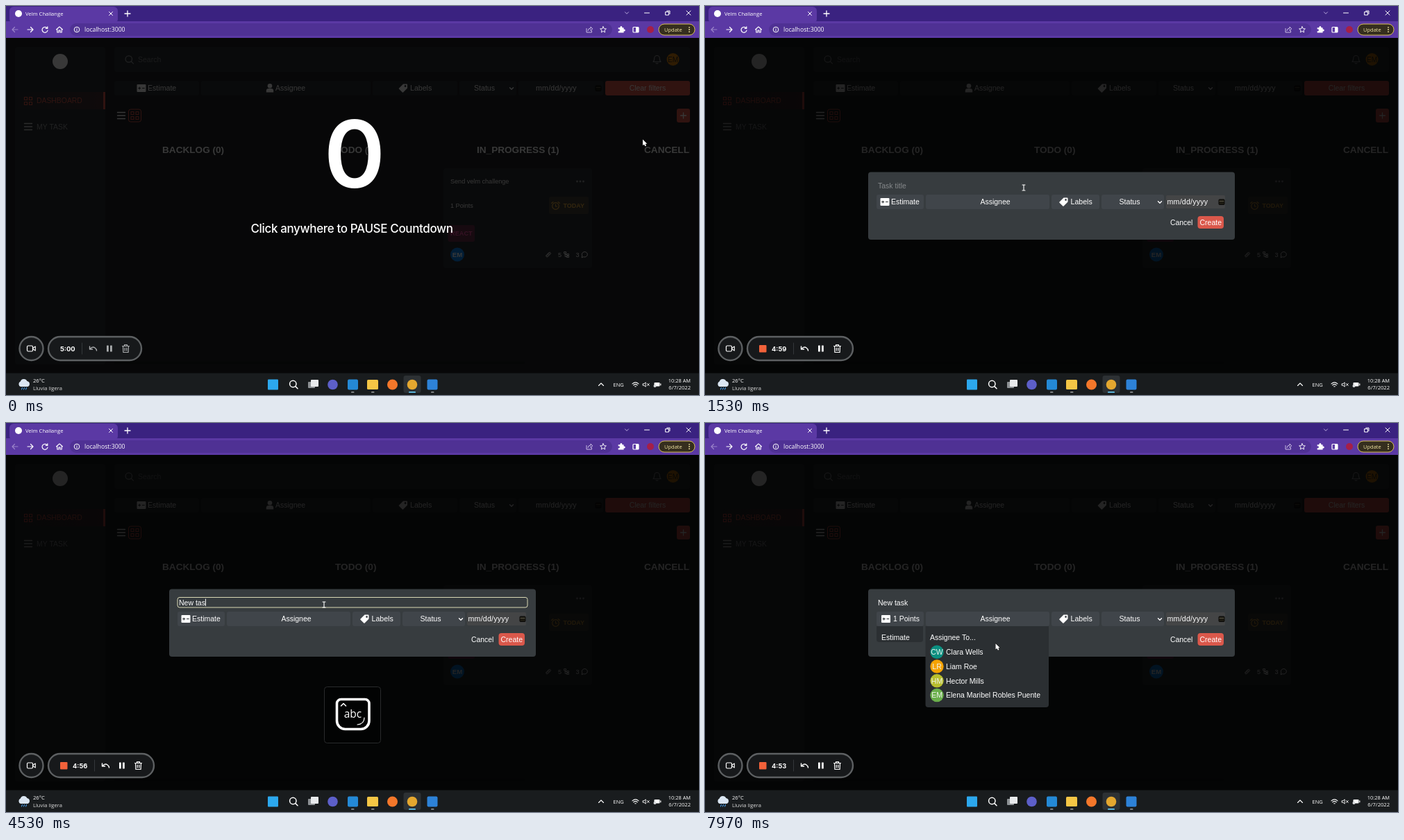
An HTML page with a canvas that plays this animation: 998 by 561 pixels, repeating every 8 s.

```html
<!DOCTYPE html>
<html lang="en">
<head>
<meta charset="utf-8">
<title>Task board</title>
<style>
html, body { margin: 0; width: 100%; height: 100%; overflow: hidden; background: #000; }
canvas { display: block; width: 998px; height: 561px; }
</style>
</head>
<body>
<canvas id="stage"></canvas>
<script>
const W = 998, H = 561, LOOP = 8000;
const canvas = document.getElementById('stage');
const ratio = window.devicePixelRatio || 1;
canvas.width = Math.round(W * ratio);
canvas.height = Math.round(H * ratio);
const c = canvas.getContext('2d');

const SANS = '"Liberation Sans", Arial, sans-serif';
const UI = '"Open Sans", "Noto Sans", sans-serif';
const INTER = 'Inter, sans-serif';
const RED = '#da584b', PAGE = '#1e2225', PANEL = '#2b2f32', WHITE = '#fff', GREY = '#94979a';
const FRAME = '#3a2280', BAR = '#5b39a4';

// ---- helpers ----
const ramp = (t, a, b) => {
  const u = Math.min(1, Math.max(0, (t - a) / (b - a)));
  return u * u * (3 - 2 * u);
};
const within = (t, a, b) => t >= a && t < b;
const latest = (list, t) => list.filter(e => e[0] <= t).pop();

function box(x, y, w, h, r, fill, stroke, lw = 1) {
  c.beginPath();
  c.roundRect(x, y, w, h, r);
  if (fill) { c.fillStyle = fill; c.fill(); }
  if (stroke) { c.strokeStyle = stroke; c.lineWidth = lw; c.stroke(); }
}
function disc(x, y, r, fill, stroke, lw) { box(x - r, y - r, 2 * r, 2 * r, r, fill, stroke, lw); }
function text(s, x, y, size, color = WHITE, font = SANS, weight = 400, align = 'left', gap = 0) {
  c.font = `${weight} ${size}px ${font}`;
  c.textAlign = align;
  c.letterSpacing = gap + 'px';
  c.fillStyle = color;
  c.fillText(s, x, y);
}
function line(d, x, y, color = WHITE, lw = 1) {
  c.save();
  c.translate(x, y);
  c.strokeStyle = color;
  c.lineWidth = lw;
  c.lineCap = c.lineJoin = 'round';
  c.stroke(new Path2D(d));
  c.restore();
}
function solid(d, x, y, color = WHITE) {
  c.save();
  c.translate(x, y);
  c.fillStyle = color;
  c.fill(new Path2D(d), 'evenodd');
  c.restore();
}
function faded(alpha, draw) {
  if (alpha <= 0) return;
  c.save();
  c.globalAlpha *= alpha;
  draw();
  c.restore();
}

// ---- icons ----
const CHEVRON = 'M-2.5 -1.2L0 1.3L2.5 -1.2';
const MENU = 'M-5.5 -4.5H5.5M-5.5 0H5.5M-5.5 4.5H5.5';
const CROSS = 'M-2.5 -2.5L2.5 2.5M2.5 -2.5L-2.5 2.5';
const PLUS = 'M-4 0H4M0 -4V4';
const GRID = 'M-5.5 -5.5h4v4h-4zM1.5 -5.5h4v4h-4zM-5.5 1.5h4v4h-4zM1.5 1.5h4v4h-4z';
const TAG = 'M6 -5Q6 -6 5 -6H0L-6 0Q-6.6 .6 -6 1.2L-1.2 6Q-.6 6.6 0 6L6 0ZM3 -4.4a1.4 1.4 0 1 0 .1 0Z';
const LENS = 'M4 -.5A4.7 4.7 0 1 1 -5.4 -.5A4.7 4.7 0 1 1 4 -.5M2.7 2.9L6 6.2';

function points(x, y) {
  box(x - 6.5, y - 5.5, 13, 11, 1, WHITE);
  line('M-4.3 0H-1.3M-2.8 -1.5V1.5M1.5 0H4.3', x, y, PANEL, 1.1);
}
function calendar(x, y) {
  box(x - 4, y - 3.5, 8, 7.5, 1, '#1c1a12', '#090909');
  line('M-3 -1H3', x, y, '#6b6656', .7);
}
function avatar(s, x, y, r, fill, color = WHITE, size = 10) {
  disc(x, y, r, fill);
  text(s, x, y + size * .36, size, color, SANS, 400, 'center');
}

// ---- page ----
function filterRow() {
  [[156, 122], [281, 244], [528, 122], [653, 82], [738, 122]].forEach(([x, w]) => box(x, 108, w, 21, 3, PANEL));
  points(195, 118.5);
  text('Estimate', 204, 122, 10.6);
  disc(380, 115.3, 3.3, WHITE);
  solid('M-5.2 6.5V4Q-5 1 -2 1H2Q5 1 5.2 4V6.5Z', 380, 118, WHITE);
  text('Assignee', 388, 122, 10.5);
  solid(TAG, 572, 118.5);
  text('Labels', 582, 122, 10.6);
  text('Status', 674, 122, 10.6);
  line(CHEVRON, 728, 119, WHITE, 1.4);
  text('mm/dd/yyyy', 763, 122, 10.67, WHITE, SANS, 400, 'left', .2);
  calendar(853, 118.5);
  box(863, 108, 122, 21, 3, RED);
  text('Clear filters', 924, 122, 10.4, WHITE, SANS, 400, 'center');
}

function taskCard() {
  box(630, 234, 214, 144, 4, PANEL);
  text('Send velm challenge', 640, 255.5, 9.1);
  [822.5, 827, 831.5].forEach(x => disc(x, 253, 1.4, GREY));
  text('1 Points', 640, 291, 9.1);
  box(782, 275, 57, 25, 3, 'rgba(229,180,84,.13)');
  disc(791.5, 288.5, 4.8, null, '#e5a940', 1.2);
  line('M0 -2.5V.5H2M-6 -4L-3.5 -6M6 -4L3.5 -6', 791.5, 288.5, '#e5a940', 1.1);
  text('TODAY', 802.5, 291.2, 9, '#e5a940', SANS, 700);
  box(636.5, 316, 38.5, 24, 3, '#682c4b');
  text('REACT', 640, 331.2, 9.2, '#f04f9d', SANS, 700);
  disc(650, 358.5, 10, '#0a84f0');
  text('EM', 650, 362, 9.6, WHITE, SANS, 700, 'center');
  line('M-3 1.5L1 -2.8Q2.6 -3.8 3.3 -2.4Q3.6 -1.4 2.8 -.6L-.6 3Q-2.5 4 -3.2 2.5Q-3.5 1.6 -2.4 .5L.6 -2.4M-1.2 1.6L1.6 -1.2', 781, 358.5, WHITE, .9);
  text('5', 795, 361.7, 9.1);
  line('M-3 -4h2.6v2.4h-2.6zM-1.8 -1.6V3H1M-1.8 0H1M1 -1h2.6v2h-2.6zM1 2h2.6v2h-2.6z', 807, 358.5, WHITE, .9);
  text('3', 820.5, 361.7, 9.1);
  line('M-3.8 4L-3.2 1.6A4 3.8 0 1 1 -1 3.4Z', 833, 358.5, WHITE, 1);
}

function page() {
  c.fillStyle = PAGE;
  c.fillRect(0, 46, W, 484);
  box(13, 59, 130, 458, 4, PANEL);
  disc(78, 80, 11, WHITE);
  const glow = c.createLinearGradient(13, 0, 143, 0);
  glow.addColorStop(0, 'rgba(200,40,35,0)');
  glow.addColorStop(1, 'rgba(200,40,35,.17)');
  c.fillStyle = glow;
  c.fillRect(13, 124, 130, 25);
  c.fillStyle = RED;
  c.fillRect(140, 124, 3, 25);
  line(GRID, 32, 137, RED, 1.2);
  text('DASHBOARD', 44, 140, 10.4, RED);
  line(MENU, 32, 174, '#c6c8c9', 1.4);
  text('MY TASK', 44, 178, 10.4, GREY);

  box(156, 59, 829, 36, 4, PANEL);
  line(LENS, 177.5, 77, GREY, 1.2);
  text('Search', 190, 80.5, 10.5, '#777a7d');
  line('M-5.5 3.5H5.5Q3.8 2 3.8 -1.5A3.8 4 0 0 0 -3.8 -1.5Q-3.8 2 -5.5 3.5ZM-1.4 5.5Q0 6.6 1.4 5.5', 937.5, 77, GREY, 1.1);
  avatar('EM', 960.5, 77, 9, '#d5800c', '#292522', 10);
  filterRow();

  line(MENU, 166, 158, WHITE, 1.4);
  box(176.5, 149, 18, 18, 3, null, RED);
  line(GRID, 185.5, 158, RED, 1.1);
  box(966, 148, 19, 20, 3, RED);
  line(PLUS, 975.5, 158, WHITE, 1.3);

  const head = (s, x) => text(s, x, 212, 13.6, WHITE, SANS, 700);
  head('BACKLOG (0)', 225);
  head('TODO (0)', 474);
  head('IN_PROGRESS (1)', 678);
  c.save();
  c.beginPath();
  c.rect(900, 190, 85, 40);
  c.clip();
  head('CANCELLED (0)', 919);
  c.restore();
  taskCard();
  box(156, 512.5, 591, 4, 2, '#171a1c');
}

function dim(alpha) {
  c.fillStyle = `rgba(0,0,0,${alpha})`;
  c.fillRect(0, 46, W, 484);
}

// ---- new task dialog ----
const TYPED = [[0, ''], [3000, 'N'], [3300, 'Ne'], [3600, 'New'], [3900, 'New '], [4100, 'New t'], [4250, 'New ta'], [4430, 'New tas'], [4600, 'New task']];
const FOCUS = [2200, 5860], PICK = 6650;

function dialog(t) {
  box(235, 239.5, 528, 97.5, 4, '#373c3f');
  const [since, typed] = latest(TYPED, t);
  const focused = within(t, ...FOCUS);
  if (focused) box(247, 251.5, 504, 14.5, 3, '#373c3f', '#d9d8b4', 1);
  text(typed || 'Task title', 249, 262.5, 10.5, typed ? WHITE : '#85888a');
  if (focused) {
    const idle = t - Math.max(since, FOCUS[0]);
    const x = 249.5 + c.measureText(typed).width;
    if (Math.floor(idle / 500) % 2 === 0) line('M0 -5V4.5', x, 259, WHITE, 1);
  }
  [[247, 68], [318, 178], [499, 69], [571, 90]].forEach(([x, w]) => box(x, 272, w, 21, 3, '#40454a'));
  box(664, 273, 85, 19, 2, '#444546');
  const picked = t >= PICK;
  points(picked ? 260.5 : 259, 282.5);
  text(picked ? '1 Points' : 'Estimate', picked ? 271 : 268, 286, 10.5);
  text('Assignee', 418, 286, 10.5, WHITE, SANS, 400, 'center');
  solid(TAG, 516.5, 282.5);
  text('Labels', 526.5, 286, 10.6);
  text('Status', 596.5, 286, 10.6);
  line(CHEVRON, 655, 283, WHITE, 1.4);
  text('mm/dd/yyyy', 665.5, 286, 10.67, WHITE, SANS, 400, 'left', .2);
  calendar(744, 282.5);
  text('Cancel', 670, 315.5, 10.4);
  box(709.5, 303, 37.5, 18, 4, RED);
  text('Create', 712.5, 315.5, 10.5);
}

function menu(x, w, h, draw) {
  if (h < 1) return;
  c.save();
  c.beginPath();
  c.roundRect(x, 293, w, h, [0, 0, 4, 4]);
  c.fillStyle = PANEL;
  c.fill();
  c.clip();
  draw();
  c.restore();
}

const PEOPLE = [['Clara Wells', 'CW', '#0b8f80'], ['Liam Roe', 'LR', '#f5a300'], ['Hector Mills', 'HM', '#b8be2d'], ['Elena Maribel Robles Puente', 'EM', '#6aaf4b']];

function menus(t) {
  const rowY = i => 330 + 20.75 * i;
  menu(247, 67, 138 * ramp(t, 5880, 6050) - 115 * ramp(t, 7600, 7900), () => {
    text('Estimate', 254, 313.3, 10.5);
    [0, 1, 2, 4, 8].forEach((n, i) => {
      points(260.5, rowY(i) + .5);
      text(n + ' Points', 270.5, rowY(i) + 4, 10.5);
    });
  });
  menu(317.5, 177.5, 117 * ramp(t, 7600, 7850), () => {
    text('Assignee To...', 324, 313.3, 10.5);
    PEOPLE.forEach(([name, initials, color], i) => {
      avatar(initials, 334, rowY(i) + .3, 9.7, color, '#eef4ee', 10.5);
      text(name, 347, rowY(i) + 4, 10.5);
    });
  });
}

function suggestions(x, w, words) {
  c.save();
  c.shadowColor = 'rgba(0,0,0,.5)';
  c.shadowBlur = 5;
  box(x, 230, w, 22, 4, '#222325');
  c.restore();
  words.forEach(([s, wx]) => text(s, wx, 245, 8.7, '#eee', UI));
}

function capsNotice() {
  box(458.5, 380.5, 81, 81, 4, '#020303', '#292b2c');
  box(476.5, 398.5, 46.5, 43, [6, 6, 12, 12], null, WHITE, 3.6);
  line('M-3.5 2L0 -1.5L3.5 2', 486, 406, WHITE, 1.6);
  text('abc', 499.5, 425, 15.5, WHITE, UI, 400, 'center');
  line('M5 -5Q5 4 -5 5', 511, 430, WHITE, 1.2);
}

// ---- recorder ----
function countdown() {
  dim(.78);
  text('0', 502, 262, 134, WHITE, INTER, 600, 'center');
  text('Click anywhere to PAUSE Countdown', 352.5, 327, 17, WHITE, INTER, 500, 'left', -.36);
}

function recorder(t) {
  const live = ramp(t, 120, 320), shift = 18 * live;
  const tone = live > .5 ? WHITE : '#a9abad';
  const back = '#17191b', rim = '#5d6062';
  disc(36.5, 494, 17, back, rim, 2.4);
  box(30.5, 490, 8, 8, 1.5, null, WHITE, 1.2);
  line('M2.5 -.8L5.8 -3V3L2.5 .8', 36.5, 494, WHITE, 1.1);
  box(61, 477, 134 + shift, 34, 17, back, rim, 2.4);
  faded(live, () => box(78, 489, 10.5, 10.5, 1, '#f2623a'));
  const left = 300 - Math.floor(t / 1000);
  const clock = `${Math.floor(left / 60)}:${String(left % 60).padStart(2, '0')}`;
  text(clock, 78 + shift, 497.5, 9.4, WHITE, INTER, 700);
  line('M0 -8V8', 109.5 + shift, 494, '#34373a', 1);
  line('M-5 -3V1H-1M-4.6 .6Q-1 -3.5 2.6 -1Q5 .8 5 3', 125.5 + shift, 494, tone, 1.4);
  box(145 + shift, 489.5, 2.8, 9, .5, tone);
  box(150 + shift, 489.5, 2.8, 9, .5, tone);
  line('M-5 -3.5H5M-2 -3.5V-5.3H2V-3.5M-4 -3.5L-3.6 5.5H3.6L4 -3.5M-1.3 -1V3M1.3 -1V3', 172.5 + shift, 494, tone, 1.2);
}

// ---- browser and taskbar ----
function browser() {
  c.fillStyle = FRAME;
  c.fillRect(0, 0, W, 23);
  c.fillStyle = BAR;
  c.fillRect(0, 22, W, 24);
  box(5, 1, 156, 24, 6, BAR);
  disc(18, 11, 5, WHITE);
  text('Velm Challange', 28, 13.8, 7.6, WHITE, UI);
  line(CROSS, 151, 11, WHITE, 1);
  line(PLUS, 175, 11, WHITE, 1.3);
  line(CHEVRON, 894, 10, '#b9a9dd', 1);
  line('M-3.5 0H3.5', 923, 10, WHITE, 1);
  line('M-3 -1.5H1.5V3H-3ZM-1.3 -3H3V1.4', 953, 10, WHITE, 1);
  line('M-3 -3L3 3M3 -3L-3 3', 983, 10, WHITE, 1);

  line('M4 0H-4M-.5 -3.5L-4 0L-.5 3.5', 13, 34, '#9a83c9', 1.2);
  line('M-4 0H4M.5 -3.5L4 0L.5 3.5', 35, 34, WHITE, 1.2);
  line('M3.2 -2.2A4 4 0 1 0 4 1M3.8 -4.2V-1.6H1.2', 56, 34, WHITE, 1.2);
  line('M-4.5 0L0 -4L4.5 0M-3.2 -.6V4H-1V1H1V4H3.2V-.6', 77, 34, WHITE, 1.1);
  box(92, 25, 781, 18, 9, '#4f3194');
  disc(102, 34, 3.8, null, WHITE);
  line('M0 -.2V1.8M0 -1.8V-1.7', 102, 34, WHITE, 1);
  text('localhost:3000', 113, 37.2, 8.7, WHITE, UI);
  line('M-4 -1.5V4H3.5V2M-2 1.5Q-1.5 -2 2 -2V-4L4.8 -1L2 1.6V0', 840, 34, '#d5cbea', .9);
  line('M0 -4.3L1.3 -1.4L4.4 -1.1L2 1L2.7 4L0 2.4L-2.7 4L-2 1L-4.4 -1.1L-1.3 -1.4Z', 860, 34, WHITE, .9);
  solid('M-4.3 -2.8H-1.5A1.5 1.6 0 1 1 1.3 -2.8H3.6V-.4A1.5 1.5 0 1 1 3.6 2.3V4.6H-4.3V2A1.5 1.5 0 1 0 -4.3 -.6Z', 886, 34);
  box(903, 30.5, 8, 7.5, 1, null, WHITE, 1.2);
  c.fillStyle = WHITE;
  c.fillRect(907, 30.5, 4, 7.5);
  disc(928, 34, 5, '#a51f47');
  box(940, 26, 52, 16, 8, '#352e1e', '#d6be55', 1);
  text('Update', 948, 36.8, 7.5, '#f4e7a5', UI);
  [-3.2, 0, 3.2].forEach(d => disc(984, 34 + d, .9, '#f4e7a5'));
}

function taskbar() {
  c.fillStyle = '#191c1e';
  c.fillRect(0, 529.5, W, 32);
  solid('M-5 4A4 4 0 0 1 -5.3 -3.4A5.2 5.2 0 0 1 4.4 -4A4.1 4.1 0 0 1 5 4Z', 26, 545, '#dbe6f2');
  line('M-3 0L-4 2.5M0 0L-1 2.5M3 0L2 2.5', 26.5, 550.5, '#459be8', 1.1);
  text('26°C', 39, 543, 7.6, WHITE, UI);
  text('Lluvia ligera', 39, 553.6, 7.6, '#ddd', UI);

  box(572.5, 533, 25, 25, 3, '#2d3134');
  box(377, 538.5, 15, 15, 1, '#2ca8ee');
  line(LENS, 414, 545.5, WHITE, 1.5);
  box(435, 542, 10, 9, 1, '#8d9194');
  box(439, 539, 11, 10, 1, '#e8eaec');
  disc(470.5, 546, 7.3, '#5d5fc9');
  box(492, 538.5, 15, 15, 2, '#2489d6');
  box(520, 539, 16, 14, 1.5, '#f5c645');
  disc(556.5, 546, 7.5, '#f4772a');
  disc(585, 546, 7.3, '#e4a72f');
  box(606.5, 538.5, 15, 15, 2, '#2d82d8');
  [499, 528, 614].forEach(x => box(x - 2, 556, 4.5, 1.8, 1, '#8b8e91'));
  box(580, 556, 10, 1.8, 1, '#60c5f0');

  line('M-3.5 1.5L0 -2L3.5 1.5', 857, 546, WHITE, 1.1);
  text('ENG', 874.5, 548.7, 7.5, WHITE, UI);
  line('M-4.5 -1.2Q0 -5 4.5 -1.2M-2.8 .8Q0 -1.6 2.8 .8M-.8 2.8H.8', 906.5, 546, WHITE, 1.1);
  line('M-4.5 -1.2H-3L-.8 -3.2V3.2L-3 1.2H-4.5ZM1.5 -1.5L4.2 1.5M4.2 -1.5L1.5 1.5', 922, 546, WHITE, .9);
  box(933.5, 543, 8, 5.5, 1, WHITE);
  line('M4.8 -1V1', 938, 545.8, WHITE, 1.2);
  disc(934.5, 548, 2, '#d9dcde');
  text('10:28 AM', 986, 542.8, 7.4, WHITE, UI, 400, 'right');
  text('6/7/2022', 986, 553.4, 7.6, WHITE, UI, 400, 'right');
}

// ---- pointer ----
const PATH = [[0, 917, 192.5], [350, 917, 192.5], [980, 974.5, 163], [1150, 974.5, 163], [1480, 459, 262], [3000, 458, 262], [4850, 458, 262], [5400, 313, 290], [5600, 313, 290], [5830, 288, 284], [6100, 288, 284], [6500, 284, 354], [6950, 284, 354], [7450, 417, 285], [7650, 417, 285], [7900, 418.5, 318], [LOOP, 418.5, 318]];

function pointer(t) {
  const i = PATH.findIndex((p, k) => k > 0 && t < p[0]);
  const [ta, xa, ya] = PATH[i - 1], [tb, xb, yb] = PATH[i];
  const k = ramp(t, ta, tb), x = xa + (xb - xa) * k, y = ya + (yb - ya) * k;
  if (within(t, 1400, 4980) || within(t, 6280, 7000)) {
    line('M-2 -4H2M0 -4V4M-2 4H2', x, y, '#fff', 1.1);
  } else {
    const arrow = 'M0 0V8.6L2 6.9L3.4 9.8L5 9.1L3.7 6.2H6.3Z';
    line(arrow, x, y, '#111', 1);
    solid(arrow, x, y);
  }
}

function draw(t) {
  c.setTransform(canvas.width / W, 0, 0, canvas.height / H, 0, 0);
  page();
  faded(1 - ramp(t, 80, 300), countdown);
  faded(ramp(t, 1180, 1380), () => { dim(.86); dialog(t); });
  faded(ramp(t, 3150, 3250) * (1 - ramp(t, 6500, 7000)), capsNotice);
  menus(t);
  recorder(t);
  browser();
  taskbar();
  if (within(t, 3400, 3950)) suggestions(261.5, 121.5, [['NE', 274], ['Need', 303], ['Need to', 342]]);
  if (within(t, 4620, FOCUS[1])) suggestions(291.5, 131.5, [['tasks', 304.5], ['tasked', 342.5], ['tasking', 386]]);
  pointer(t);
}

const start = performance.now();
function tick() {
  draw((performance.now() - start) % LOOP);
  requestAnimationFrame(tick);
}
tick();
</script>
</body>
</html>
```
